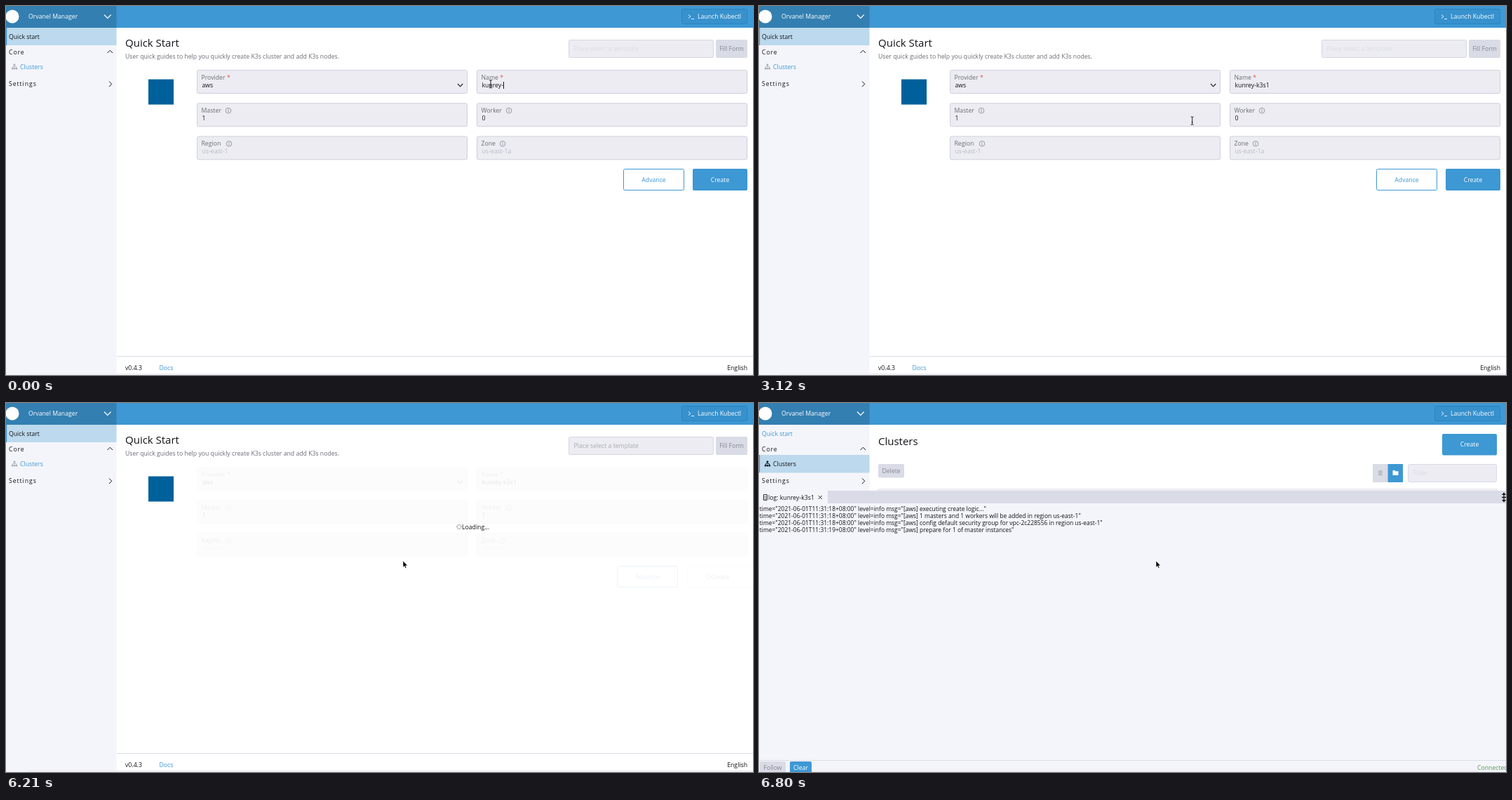
Recreate the animation shown at these times as an HTML page. Size 1065 px wide and 526 px high, loop 8 s.

```html
<!DOCTYPE html>
<html lang="en">
<head>
<meta charset="utf-8">
<title>Cluster quick start</title>
<style>
  html, body { margin: 0; width: 100%; height: 100%; overflow: hidden; background: #fff; }
  svg { display: block; width: 1065px; height: 526px; font: 8.7px "Open Sans", "Noto Sans", sans-serif; }
</style>
</head>
<body>
<svg id="stage" viewBox="0 0 1065 526"></svg>
<script>
const LOOP = 8000, TICK = 147.7;
const BLUE = '#3d98d3', INK = '#141419', MUTED = '#6c6c76', FAINT = '#b9bac7',
      PANEL = '#f4f5fa', FIELD = '#ececf2', EDGE = '#cfd0de', GREY = '#d9dbe6';
const stage = document.getElementById('stage');
const pen = document.createElement('canvas').getContext('2d');
pen.font = '8.7px "Open Sans", "Noto Sans", sans-serif';

const text = (x, y, s, fill = INK, more = '') => `<text x="${x}" y="${y}" fill="${fill}" ${more}>${s}</text>`;
const mid = (x, y, s, fill) => text(x, y, s, fill, 'text-anchor="middle"');
const rect = (x, y, w, h, fill, more = '') =>
  `<rect x="${x}" y="${y}" width="${w}" height="${h}" fill="${fill}" ${more}/>`;
const box = (x, y, w, h, fill, stroke, r = 2) =>
  rect(x + .5, y + .5, w - 1, h - 1, fill, `stroke="${stroke}" rx="${r}"`);
const line = (d, stroke = INK, width = 1) =>
  `<path d="${d}" fill="none" stroke="${stroke}" stroke-width="${width}"/>`;
const shape = (d, fill, more = '') => `<path d="${d}" fill="${fill}" ${more}/>`;
const group = (s, more) => `<g ${more}>${s}</g>`;

// Cursor keys: tick, x, y
const path = [[16, 691, 111], [19, 687, 160], [22, 583, 165], [24, 654, 160], [26, 786, 228],
  [27, 786, 228], [28, 937, 255], [30, 1007, 249], [35, 1007, 249], [42, 566, 225]];

function cursorAt(n) {
  const i = path.findIndex(k => k[0] > n);
  if (i === 0) return path[0].slice(1);
  if (i < 0) return path[path.length - 1].slice(1);
  const [a, x, y] = path[i - 1], [b, u, v] = path[i], p = (n - a) / (b - a);
  return [x + (u - x) * p, y + (v - y) * p];
}

function cursor(n) {
  const [x, y] = cursorAt(n);
  let art;
  if (n < 25) art = line('M-2 -5.5Q0 -5.5 0 -4Q0 -5.5 2 -5.5M0 -4V4.5M-2 6Q0 6 0 4.5Q0 6 2 6M-1 2H1', '#222');
  else if (n >= 28 && n < 34)
    art = shape('M-1 1Q0 -.6 1 1V4.5L5.5 5.5Q7 6 6.5 8L5.5 11.5H0L-3.5 7.5Q-3.5 6 -1 7.5Z',
      '#fff', 'stroke="#111"') + line('M2.5 5V7M4.3 5.5V7.5', '#111', .7);
  else art = shape('M0 0V9.2L2 7.4L3.5 10.6L5 10L3.6 6.9L6.4 6.7Z', '#000', 'stroke="#fff" stroke-width=".6"');
  return group(art, `transform="translate(${x} ${y})"`);
}

function spinner(x, y, n, stroke) {
  let d = '';
  for (let i = 0; i < 8; i++) {
    const a = (i + n / 3) * Math.PI / 4, c = Math.cos(a), s = Math.sin(a);
    d += `M${x + 2 * c} ${y + 2 * s}L${x + 3.9 * c} ${y + 3.9 * s}`;
  }
  return line(d, stroke, .9);
}

function frame(active) {
  const tone = on => on ? INK : BLUE;
  const tint = active ? '#555' : '#aaacb6', y = active ? 74 : 31;
  const mark = active ? INK : tint;
  return rect(0, 31, 157.5, 495, PANEL)
    + rect(0, 0, 1065, 31, BLUE) + rect(0, 0, 157.5, 31, '#337fb1')
    + '<circle cx="9" cy="15" r="9.5" fill="#fff"/>'
    + text(32, 18, 'Orvanel Manager', '#fff')
    + line('M140 12.5l4.8 5 4.8-5', '#fff', 1.2)
    + box(963, 4, 94, 22, '#3791cd', '#2d84be')
    + line('M973 12.5l3 2.5-3 2.5M977 18.5h4', '#fff', .9)
    + text(986, 18, 'Launch Kubectl', '#fff')
    + rect(0, y, 157.5, active ? 25.5 : 25, '#bcd9ed') + rect(0, y, 1.2, 25, BLUE)
    + text(4, 46.7, 'Quick start', tone(!active))
    + text(4, 68.7, 'Core', INK, 'letter-spacing=".9"') + line('M144.5 67l3.8-3.8 3.8 3.8')
    + line('M12 84v2.5M9.5 88.5v-2h5.2v2', mark, .8)
    + rect(10.7, 82.6, 2.6, 2.6, mark) + rect(8, 88, 2.4, 2.4, mark)
    + rect(10.9, 88, 2.4, 2.4, mark) + rect(13.8, 88, 2.4, 2.4, mark)
    + text(20, 89.7, 'Clusters', tone(active))
    + text(4, 114.3, 'Settings', INK, 'letter-spacing=".95"') + line('M147 107.5l3.8 3.8-3.8 3.8')
    + rect(157.5, 499, 907.5, 1, '#dcdee7')
    + text(170, 518.5, 'v0.4.3') + text(218.5, 518.5, 'Docs', BLUE)
    + text(1057, 518.5, 'English', INK, 'text-anchor="end"')
    + rect(30, 523.5, 1035, 2.5, '#f0f0f4');
}

const info = (x, y) => `<circle cx="${x}" cy="${y}" r="3.8" fill="none" stroke="#85858f" stroke-width=".8"/>`
  + line(`M${x} ${y - .6}v2.6M${x} ${y - 2.2}v1`, '#85858f', .9);

function field(x, row, label, value, fill = INK, infoX = 0) {
  const y = 91 + 47.2 * row;
  const star = infoX ? info(infoX, y + 58.4 - 47.2 + -.3)
    : text(x + 8 + pen.measureText(label).width + 1, y + 13.6, '*', '#e2574c');
  return rect(x + .5, y + .5, 385, 33, FIELD, `stroke="${EDGE}" rx="2"`)
    + text(x + 6.5, y + 13.6, label, MUTED) + star + text(x + 7.5, y + 25, value, fill);
}

const caret = (x, y) => rect(x, y, 1, 10, INK);

function quickStart(n) {
  const busy = n >= 31, loading = n >= 32;
  const fade = [.6, .35, .18, .1][Math.min(n - 31, 3)] ?? 1;
  const typed = '-k3s1'.slice(0, n < 9 ? 1 : n < 15 ? Math.min(n - 7, 4) : 5);
  const name = 'kunrey' + typed;
  const nameCaret = n < 17 && !(n >= 3 && n < 6) && n !== 14;
  const workerCaret = n >= 24 && n < 31;
  const ax = busy ? 871 : 880;
  let form = field(272, 0, 'Provider', 'aws') + line('M644 111l3.6 3.8 3.6-3.8', INK, 1.1)
    + field(671, 0, 'Name', name)
    + field(272, 1, 'Master', '1', INK, 317)
    + field(671, 1, 'Worker', n < 24 ? '0' : '1', INK, 717)
    + field(272, 2, 'Region', 'us-east-1', FAINT, 318)
    + field(671, 2, 'Zone', 'us-east-1a', FAINT, 708)
    + box(ax, 232, 87, 31, '#fff', BLUE) + mid(ax + 43.5, 250.5, 'Advance', BLUE);
  form += busy
    ? box(971, 232, 93, 31, '#fff', '#e4e6ec') + spinner(1001, 247.5, n, MUTED) + text(1005, 250.5, 'Create', MUTED)
    : rect(979, 232, 78, 31, BLUE, 'rx="2"') + mid(1018, 250.5, 'Create', '#fff');
  if (nameCaret) form += caret(678.5 + pen.measureText(name).width, 108);
  if (workerCaret) form += caret(683, 155);
  return frame(false)
    + text(170, 57.5, 'Quick Start', INK, 'font-size="15"')
    + text(170, 75.3, 'User quick guides to help you quickly create K3s cluster and add K3s nodes.', MUTED)
    + box(802, 48, 207, 26, FIELD, '#d5d6e2')
    + text(809.5, 64, 'Place select a template', loading ? '#a9aab5' : '#dcdde6')
    + rect(1012, 48, 45, 26, GREY, 'rx="2"') + mid(1034.5, 64, 'Fill Form', '#84858f')
    + rect(203, 104.5, 36, 36, '#00609b')
    + group(form, `opacity="${fade}"`)
    + (loading ? spinner(646, 176.5, n, '#666') + text(650, 179.6, 'Loading...') : '');
}

function clusters(shift) {
  const sort = x => line(`M${x - 2.2} 141l2.2-2.4 2.2 2.4M${x - 2.2} 143.4l2.2 2.4 2.2-2.4`, '#85858f', .9);
  const column = ([x, label, at]) => text(x, 145.2, label) + sort(at);
  const tools = rect(979, 44, 78, 30.5, BLUE, 'rx="2"') + mid(1018, 62.3, 'Create', '#fff')
    + rect(880, 87, 21.5, 26, GREY) + line('M888 97.2h5.6M888 99.7h5.6M888 102.2h5.6', '#85858f', .8)
    + rect(901.5, 87, 21.5, 26, BLUE) + shape('M908.5 96h3l1 1.2h4v5.8h-8z', '#fff')
    + box(930, 87, 127, 26, FIELD, '#d9dae5') + text(938, 103, 'Filter', '#dadbe5');
  return frame(true)
    + text(170, 59.5, 'Clusters', INK, 'font-size="15"')
    + rect(170, 87, 37, 19.5, GREY, 'rx="2"') + mid(188.5, 100, 'Delete', '#84858f')
    + group(tools, `transform="translate(${-shift} 0)"`)
    + rect(167, 122, 893 - shift, 65, '#ededf0', 'rx="5"')
    + rect(170, 126, 887, 57, '#fff') + rect(170, 126, 887, 33, '#d2e2f1')
    + rect(170, 183, 887, 1, '#d4d6df')
    + rect(176.5, 138.5, 7.5, 7.5, '#fff', 'stroke="#74747c" stroke-width=".9" rx="1"')
    + [[193, 'State', 218.3], [342, 'Name', 370], [502, 'Region', 534.6],
       [681, 'Master', 712.6], [857, 'Worker', 890]].map(column).join('')
    + mid(613.7, 173.8, 'No Data');
}

const statusBar = shape('M0 517.5H352Q355 517.5 355 520.5V526H0Z', '#3a3b3f')
  + text(1, 527, 'Waiting for localhost', '#c9cacd', 'font-size="7.8"');

const log = [
  ['18', 'executing create logic...'],
  ['18', '1 masters and 1 workers will be added in region us-east-1'],
  ['18', 'config default security group for vpc-2c228556 in region us-east-1'],
  ['19', 'prepare for 1 of master instances']
].map(([s, msg], i) => text(.8, 153.7 + 10.25 * i,
  `time="2021-06-01T11:31:${s}+08:00" level=info msg="[aws] ${msg}"`, INK, 'font-size="8.46"')).join('');

const drawer = rect(0, 125, 1065, 401, PANEL) + rect(0, 125, 1065, 18, GREY) + rect(0, 125, 98, 18, PANEL)
  + box(6, 130, 6, 9, 'none', '#333', .5) + line('M7.5 133h3M7.5 135h3M7.5 137h3', '#333', .7)
  + text(13, 137.6, 'log: kunrey-k3s1')
  + line('M84.8 132l5 5M89.8 132l-5 5', INK, .9)
  + line('M1062 130v9M1059 134.5h6', INK, 1.3) + shape('M1062 127.5l3 3.5h-6zM1062 141.5l3-3.5h-6z', INK)
  + rect(0, 509, 1065, 1, '#dcdee7')
  + rect(1, 511, 37, 17, GREY, 'rx="2"') + mid(19.5, 523, 'Follow', '#84858f')
  + rect(44, 511, 31, 17, BLUE, 'rx="2"') + mid(59.5, 523, 'Clear', '#fff')
  + text(1024, 523, 'Connected', '#4f9a4f')
  + rect(75, 523.5, 950, 2.5, '#ededf2');

function scene(n) {
  if (n < 43) return quickStart(n);
  if (n < 45) return clusters(0) + statusBar;
  return clusters(5) + drawer + (n >= 46 ? log : '');
}

let shown = -1;
function draw(now) {
  const n = Math.floor(now % LOOP / TICK);
  if (n !== shown) stage.innerHTML = scene(n) + cursor(n);
  shown = n;
  requestAnimationFrame(draw);
}
draw(performance.now());
</script>
</body>
</html>
```
